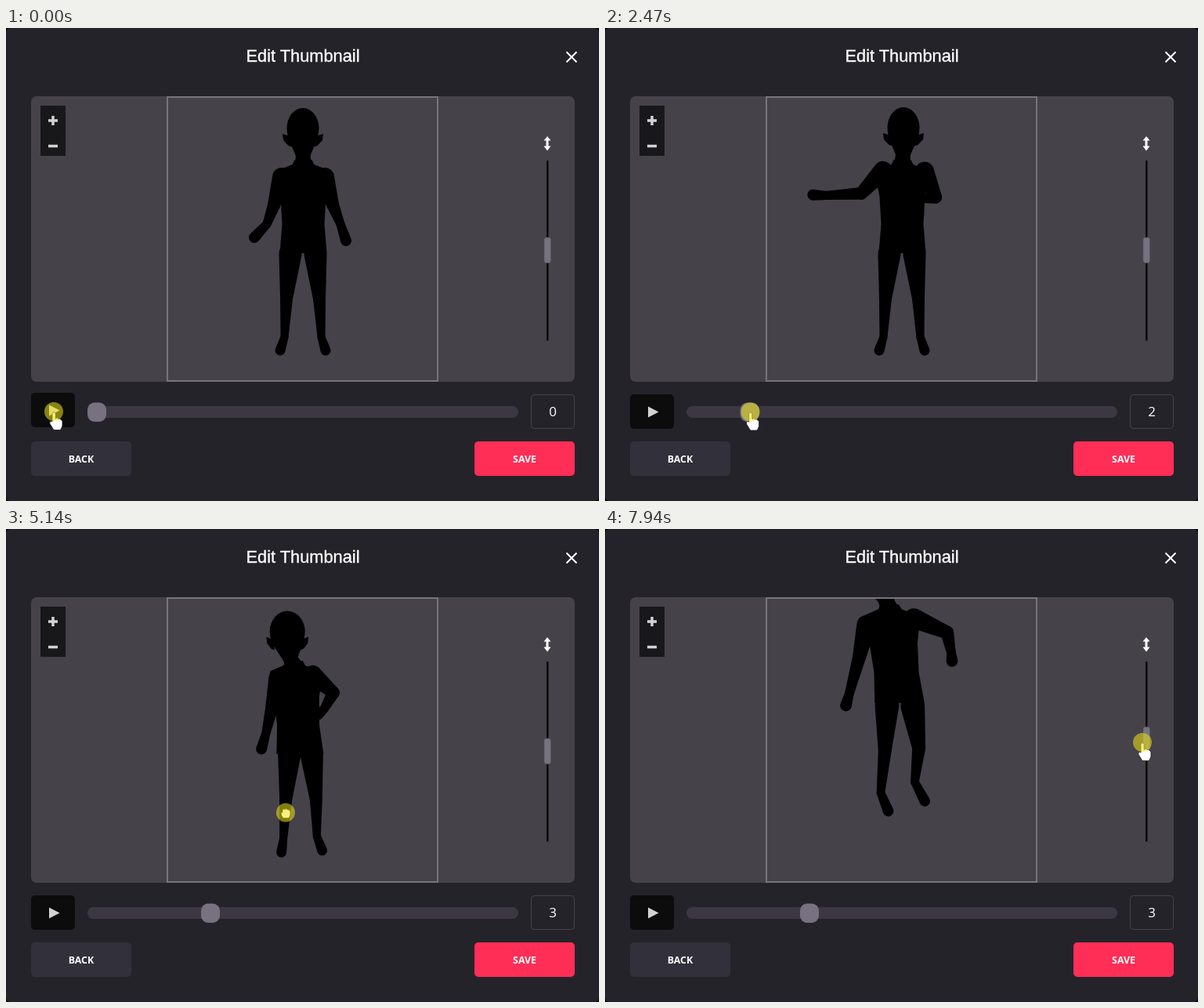
An HTML page with a canvas that plays this animation: 757 px wide and 603 px high, repeating every 8000 ms.

```html
<!DOCTYPE html>
<html lang="en">
<head>
<meta charset="utf-8">
<title>Edit Thumbnail</title>
<style>
  html, body { margin: 0; width: 100%; height: 100%; overflow: hidden; background: #08080a; }
  svg, canvas { position: absolute; left: 0; top: 0; display: block; }
  canvas { left: 207px; top: 89px; }
  text { fill: #fff; text-anchor: middle; }
  .title { font: 21.8px "Liberation Sans", Arial, sans-serif; stroke: #fff; stroke-width: .35px; }
  .label { font: 700 12.4px "Open Sans", "Noto Sans", sans-serif; }
  .value { font: 500 17px "Open Sans", "Noto Sans", sans-serif; }
</style>
</head>
<body>
<svg width="757" height="603" viewBox="0 0 757 603">
  <rect width="757" height="603" rx="6" fill="#25232a"/>
  <text class="title" x="379" y="43">Edit Thumbnail</text>
  <path d="M715.5 30.500L728.500 43.500M728.500 30.500L715.500 43.500" stroke="#fff" stroke-width="2"/>
  <rect x="32" y="87" width="694" height="364" rx="7" fill="#45424a"/>
  <rect x="206" y="88" width="345" height="362" fill="none" stroke="#77747f" stroke-width="2"/>
  <rect x="44" y="99" width="32" height="64" fill="#18171a"/>
  <path d="M54 118H66M60 112V124M54 150.500H66" stroke="#d2d1d3" stroke-width="3.500"/>
  <path d="M691 138L695.500 143.500H692.500V150.500H695.500L691 156.500L686.500 150.500H689.500V143.500H686.500Z" fill="#fff"/>
  <path d="M691.300 169V398.500" stroke="#040404" stroke-width="2.200"/>
  <rect id="level" x="687" y="267" width="8.500" height="32.500" rx="3" fill="#77727f" stroke="#56525c" stroke-width=".6"/>
  <g id="play">
    <rect x="32" y="467" width="56" height="44" rx="5" fill="#0c0c0d"/>
    <path id="icon" fill="#d3d2d5"/>
  </g>
  <rect x="104" y="482" width="550" height="15" rx="7.500" fill="#3b3843"/>
  <rect id="thumb" x="-12" y="477.500" width="24" height="24.500" rx="9" fill="#777180"/>
  <rect x="670.500" y="467.500" width="55" height="43" rx="4" fill="none" stroke="#45424d"/>
  <text id="value" class="value" x="698" y="494.500">0</text>
  <rect x="32" y="527" width="128" height="44" rx="5" fill="#32303a"/>
  <text class="label" x="96" y="554">BACK</text>
  <rect x="598" y="527" width="128" height="44" rx="5" fill="#ff2e56"/>
  <text class="label" x="662" y="554">SAVE</text>
</svg>
<canvas id="stage" width="344" height="361"></canvas>
<svg width="757" height="603" viewBox="0 0 757 603">
  <g id="cursor">
    <path id="pointer" fill="#fff" stroke="#17161a" stroke-width=".8"/>
    <circle id="press" r="12" fill="rgb(240,230,20)" fill-opacity=".55"/>
  </g>
</svg>
<script>
const LOOP = 8000;
const $ = id => document.getElementById(id);
const ctx = $('stage').getContext('2d');

const ICONS = {
  play: 'M55 482.500L68.500 489.500L55 496.500Z',
  pause: 'M55 483H59.500V496H55ZM63 483H67.500V496H63Z'
};
const POINTERS = {
  hand: 'M-2 2Q0-1 2.200 2V9Q5 7 6 9.500Q8 8 9 10.500Q11 10 11 13V18Q10 21 8.500 23.500H0L-5 15.500Q-6 12-3 12L-2 13Z',
  arrow: 'M0 0V16L3.800 12.500L6.500 18.500L9 17.500L6.500 11.700H11Z',
  grab: 'M-6-1Q-4-3-2 0V-6Q-1-9 1-6Q2-9 4-6Q6-8 7-4Q9-5 9-1V4Q8 9 6 10H-1Q-4 6-6-1Z',
  fist: 'M-6 0Q-5-1-4 0V-3Q-2-6-1-4Q1-6 2-4Q4-5 4-3Q6-4 6-1V3Q5 6 4 7H-3Q-6 4-6 0Z'
};

// The figure is a rig: joints move, limb thickness stays.
const ARM = [12, 8, 5.5, 7];
const LEG = [14.5, 8, 5, 6.5];
const TORSO = [[168, 11], [174, 14], [181, 31], [190, 34], [215, 29], [250, 27], [287, 30]];

const leg = [[363,288], [358,345], [355.5,394], [350,411]];
const shift = (points, dx) => points.map(([x, y]) => [x + dx, y]);
const mirror = points => points.map(([x, y]) => [758 - x, y]);

// head: x, y, half width, ear size; spine: x at neck and hip
const rest = {
  head: [379, 128, 20.5, 1], spine: [379.5, 379.5],
  armL: [[352,190], [342,226], [333,250], [317,267]],
  armR: [[407,190], [417,225], [427,250], [434,271]],
  legL: leg, legR: mirror(leg)
};
const reach = {
  ...rest, head: [381, 127, 20.5, 1],
  armL: [[355,181], [327,210], [282,213], [265,212]],
  armR: [[408,182], [422,215], [400,219], [353,220]]
};
const wave = {
  ...rest, head: [381, 128, 20.5, 1],
  armL: [[354,188], [328,219], [284,219], [269,219]],
  armR: [[408,188], [423,223], [433,203], [434,179]]
};
const stand = {
  head: [360, 131, 22, 1], spine: [369, 375.5],
  armL: [[350,192], [342,228], [336,257], [330,278]],
  armR: [[391,186], [414,209], [398,228], [388,233]],
  legL: shift(leg, -1), legR: shift(mirror(leg), -5)
};
const turned = {
  head: [356, 129, 24.5, 0], spine: [364, 376],
  armL: [[336,193], [327,232], [315,276], [311,290]],
  armR: [[393,185], [433,207], [438,236], [439,251]],
  legL: [[360.5,290], [358,344], [353,395], [362,417]],
  legR: [[391.5,291], [399,341], [394,382], [406,405]]
};

// Each move: start, end, value reached; the value holds in between.
const poseMoves = [[200, 1340, reach], [2400, 3170, wave], [3240, 3700, stand], [5000, 5700, turned]];
const cursorMoves = [[1570, 2270, [180,488]], [2400, 3170, [241,504]], [3240, 3720, [262,513]],
  [4380, 5000, [340,362]], [5000, 5700, [424,360]], [5850, 6480, [745,285]],
  [6480, 6740, [693,283]], [7270, 7670, [686,261]], [7800, 7940, [686,272]]];
const presses = [[0, 190], [1200, 1330], [2400, 3600], [5000, 5880], [7060, LOOP]];

const clamp = v => Math.max(0, Math.min(1, v));

function mix(a, b, k) {
  if (typeof a === 'number') return a + (b - a) * k;
  if (Array.isArray(a)) return a.map((v, i) => mix(v, b[i], k));
  return Object.fromEntries(Object.keys(a).map(key => [key, mix(a[key], b[key], k)]));
}
function follow(value, moves, t) {
  for (const [start, end, goal] of moves) {
    if (t > start) value = mix(value, goal, clamp((t - start) / (end - start)));
  }
  return value;
}
const cursorAt = t => follow([61, 489], cursorMoves, t);

function polygon(points) {
  ctx.beginPath();
  points.forEach(([x, y]) => ctx.lineTo(x, y));
  ctx.fill();
}

function capsule([x1, y1], r1, [x2, y2], r2) {
  const angle = Math.atan2(y2 - y1, x2 - x1);
  const length = Math.hypot(x2 - x1, y2 - y1) || 1;
  const side = Math.acos(Math.max(-1, Math.min(1, (r1 - r2) / length)));
  ctx.beginPath();
  ctx.arc(x1, y1, r1, angle + side, angle - side);
  ctx.arc(x2, y2, r2, angle - side, angle + side);
  ctx.fill();
}

function limb(joints, radii) {
  for (let i = 1; i < joints.length; i++) {
    capsule(joints[i - 1], radii[i - 1], joints[i], radii[i]);
  }
}

function drawHead([x, y, width, ear], neck) {
  ctx.beginPath();
  ctx.ellipse(x, y, width, 26, 0, 0, 2 * Math.PI);
  ctx.fill();
  const chin = [mix(x, neck, .4), y + 34];
  limb([[x, y + 6], chin, [neck, 176]], [width - 1, 9, 11]);
  for (const side of [-1, 1]) {
    const at = (dx, dy) => [x + side * (width + dx * ear), y + dy];
    polygon([at(-4, 10), at(5.5, 7), at(4.5, 15), at(-2, 22), at(-8, 24)]);
  }
}

function drawTorso([neck, hip]) {
  const edge = side => TORSO.map(([y, width]) =>
    [mix(neck, hip, (y - 172) / 118) + side * width, y]);
  polygon([...edge(-1), ...edge(1).reverse()]);
}

function drawFigure(t, pitch) {
  const pose = follow(rest, poseMoves, t);
  const scale = 1 + .06 * pitch;
  ctx.setTransform(1, 0, 0, 1, 0, 0);
  ctx.clearRect(0, 0, 344, 361);
  ctx.setTransform(scale, 0, 0, scale, 370 * (1 - scale) - 207, -84 * pitch - 89);
  drawHead(pose.head, pose.spine[0]);
  drawTorso(pose.spine);
  limb(pose.legL, LEG);
  limb(pose.legR, LEG);
  limb(pose.armL, ARM);
  // This arm points at the viewer, so pitching the camera lifts its far end.
  limb(pose.armR.map(([x, y], i) => [x, y - 5 * i * pitch]), ARM);
}

function pointerKind(x, y, pressed) {
  const overSlider = Math.abs(x - 691) < 10;
  const overControls = y > 465 && y < 511;
  if (overSlider || overControls) return 'hand';
  if (x < 726 && y < 451) return pressed ? 'fist' : 'grab';
  return 'arrow';
}

function draw(t) {
  const [x, y] = cursorAt(t);
  const pressed = presses.some(([a, b]) => t >= a && t < b);
  const played = clamp((t - 200) / 1125);
  const thumbX = t < 2400 ? 116 + 63 * played : cursorAt(Math.min(t, 3720))[0] - 1;
  const level = t < 7270 ? 0 : 1.33 * (283 - y);
  const overPlay = x < 88 && y > 465;

  drawFigure(t, level / 15);
  $('level').setAttribute('transform', `translate(0 ${-level})`);
  $('thumb').setAttribute('transform', `translate(${thumbX} 0)`);
  $('value').textContent = Math.ceil((thumbX - 116) / 63.5);
  $('play').setAttribute('transform', `translate(0 ${overPlay ? -2 : 0})`);
  $('icon').setAttribute('d', played > 0 && played < 1 ? ICONS.pause : ICONS.play);
  $('cursor').setAttribute('transform', `translate(${x} ${y})`);
  $('pointer').setAttribute('d', POINTERS[pointerKind(x, y, pressed)]);
  $('press').setAttribute('visibility', pressed ? 'visible' : 'hidden');
}

const start = performance.now();
function tick() {
  draw((performance.now() - start) % LOOP);
  requestAnimationFrame(tick);
}
tick();
</script>
</body>
</html>
```
